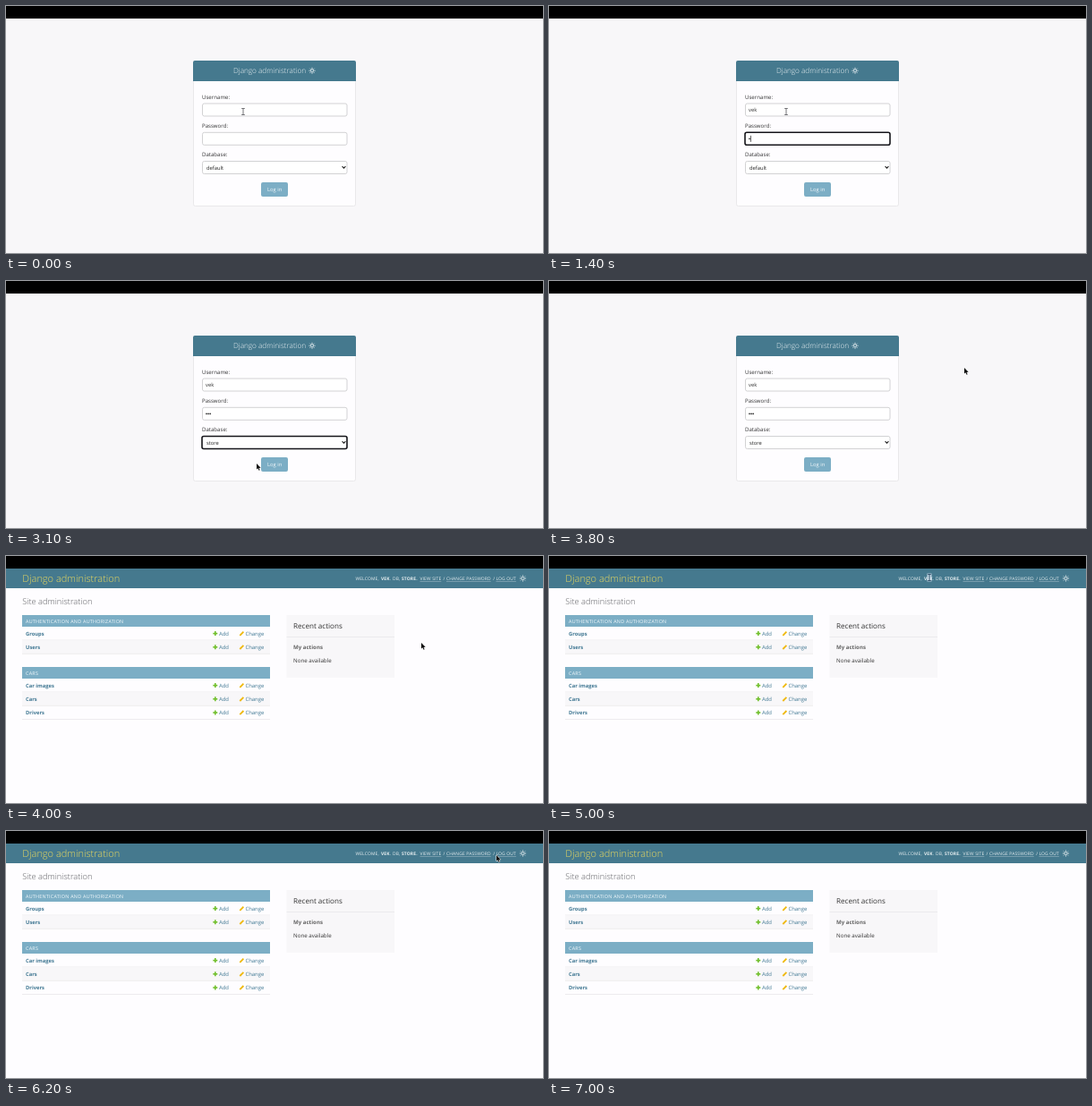
Recreate the animation shown at these times as an HTML page with a canvas. Size 600x276 px, loop 7200 ms.

```html
<!DOCTYPE html>
<html lang="en">
<head>
<meta charset="utf-8">
<title>Django administration</title>
<style>
  html, body { margin: 0; width: 600px; height: 276px; overflow: hidden; }
  canvas { display: block; }
</style>
</head>
<body>
<canvas id="stage" width="600" height="276"></canvas>
<script>
const ctx = document.getElementById('stage').getContext('2d');
const LOOP = 7200, STEP = 100;
const TEAL = '#45798e', BLUE = '#7caec5', LINK = '#417893', PALE = '#f8f7f9';
const USER = 'vek';

// Pointer path: time, x, y
const PATH = [
  [3000, 279, 198], [3100, 280, 204], [3300, 293, 207], [3500, 297, 208],
  [3600, 312, 204], [3700, 374, 180], [3800, 464, 97], [4100, 464, 97],
  [4200, 463, 88], [4400, 442, 40], [4600, 428, 24], [5000, 425, 24],
  [5300, 448, 24], [5500, 470, 24], [5900, 515, 24], [6100, 545, 25],
  [6200, 548, 27], [6300, 550, 28], [6400, 530, 45], [6500, 440, 108],
  [6600, 310, 185], [6700, 179, 249], [6800, 60, 300]
];

function rect(x, y, w, h, color) {
  ctx.fillStyle = color;
  ctx.fillRect(x, y, w, h);
}

function box(x, y, w, h, r, fill, stroke, width = 1) {
  ctx.beginPath();
  ctx.roundRect(x, y, w, h, r);
  if (fill) { ctx.fillStyle = fill; ctx.fill(); }
  if (stroke) { ctx.strokeStyle = stroke; ctx.lineWidth = width; ctx.stroke(); }
}

function line(points, color, width) {
  ctx.beginPath();
  points.forEach(([x, y]) => ctx.lineTo(x, y));
  ctx.strokeStyle = color;
  ctx.lineWidth = width;
  ctx.stroke();
}

function text(str, x, y, size, color, weight = 400, spacing = 0) {
  ctx.font = `${weight} ${size}px "Open Sans", "Noto Sans", sans-serif`;
  ctx.letterSpacing = spacing + 'px';
  ctx.fillStyle = color;
  ctx.fillText(str, x, y);
  return ctx.measureText(str).width;
}

function sun(x, y, color) {
  ctx.beginPath();
  ctx.arc(x, y, 1.6, 0, 7);
  ctx.strokeStyle = color;
  ctx.lineWidth = 0.9;
  ctx.stroke();
  for (let i = 0; i < 8; i++) {
    const c = Math.cos(i * Math.PI / 4), s = Math.sin(i * Math.PI / 4);
    line([[x + c * 2.3, y + s * 2.3], [x + c * 3.6, y + s * 3.6]], color, 0.8);
  }
}

function arrow(x, y) {
  const shape = [[0, 0], [0, 6.6], [1.5, 5.3], [2.6, 7.8], [3.7, 7.3], [2.6, 4.9], [4.7, 4.7]];
  ctx.beginPath();
  shape.forEach(([dx, dy]) => ctx.lineTo(x + dx, y + dy));
  ctx.closePath();
  ctx.strokeStyle = '#fff';
  ctx.lineWidth = 1;
  ctx.stroke();
  ctx.fillStyle = '#111';
  ctx.fill();
}

function beam(x, y, color) {
  line([[x, y - 3.5], [x, y + 3.5]], color, 0.9);
  for (const dy of [-3.5, 3.5]) line([[x - 1.8, y + dy], [x + 1.8, y + dy]], color, 0.9);
}

function pointer(t) {
  const i = PATH.findIndex(key => key[0] > t);
  if (i < 1) return;
  const [t0, x0, y0] = PATH[i - 1], [t1, x1, y1] = PATH[i];
  const k = (t - t0) / (t1 - t0);
  const x = x0 + (x1 - x0) * k, y = y0 + (y1 - y0) * k;
  if (t >= 4600 && t < 5500) {
    rect(x - 2.5, y - 4.5, 5, 9, 'rgba(225,238,250,0.75)');
    beam(x, y, '#2b4a66');
  } else arrow(x, y);
}

const typed = (t, times) => times.filter(at => t >= at).length;

function field(label, y, focused) {
  text(label, 219, y - 4.6, 6.1, '#333');
  if (focused) box(219, y + 0.5, 162, 14, 2, '#fff', '#15151a', 1.6);
  else box(219.5, y + 0.5, 161.5, 14, 2, '#fff', '#cdcdd0', 0.9);
}

const caret = (x, y) => rect(x, y - 3.5, 0.7, 7, '#222');

function loginPage(t) {
  rect(0, 14, 600, 262, PALE);
  box(209.5, 61.5, 181, 162, 2, '#fefdff', '#e9e8ea', 1);
  box(209, 61, 182, 23, [2, 2, 0, 0], TEAL);
  text('Django administration', 254, 75.4, 8.2, '#edf3f5', 300);
  sun(342, 72.3, '#edf3f5');

  const inName = t >= 300 && t < 1100;
  const inPass = t >= 1100 && t < 2200;
  const inSelect = t >= 2200 && t < 3700;

  field('Username:', 108.5, inName);
  const name = USER.slice(0, typed(t, [600, 700, 900]));
  const nameWidth = text(name, 223, 118, 5.8, '#333');
  if (inName) caret(223 + nameWidth, 116);

  field('Password:', 140.8, inPass);
  const dots = typed(t, [1400, 1600, 1800]);
  for (let i = 0; i < dots; i++) {
    ctx.beginPath();
    ctx.arc(224 + i * 2.1, 148.3, 0.9, 0, 7);
    ctx.fillStyle = '#333';
    ctx.fill();
  }
  if (inPass) caret(223.2 + dots * 2.1, 148.3);

  field('Database:', 173, inSelect);
  text(t < 2400 ? 'default' : 'store', 224, 182.5, 5.8, '#222');
  line([[375.6, 179.2], [377.5, 181.2], [379.4, 179.2]], '#222', 1.1);

  box(285, 197, 30, 16, 2, BLUE);
  text('Log in', 292, 207.3, 5.8, '#f4f9fb');

  if (t < 1700) beam(265, 118, '#66666a');
}

function moduleTable(title, y, rows) {
  rect(18, y, 277, 13, BLUE);
  text(title, 22, y + 8.6, 5.4, '#f5fafc', 400, 0.25);
  rows.forEach((name, i) => {
    const top = y + 13 + i * 15.2, mid = top + 8;
    if (i % 2) rect(18, top, 277, 15, PALE);
    rect(18, top + 14.6, 277, 0.8, '#e9e8ea');
    text(name, 22, mid + 2, 5.8, LINK, 700);
    line([[231.3, mid - 0.4], [236.3, mid - 0.4]], '#70bf2b', 1.6);
    line([[233.8, mid - 2.9], [233.8, mid + 2.1]], '#70bf2b', 1.6);
    text('Add', 238, mid + 2, 5.9, LINK);
    line([[261.3, mid + 1.8], [265.4, mid - 2.4]], '#efb80b', 1.8);
    text('Change', 267.5, mid + 2, 5.9, LINK);
  });
}

function userTools() {
  const put = (str, x, weight) => text(str, x, 26.6, 4.95, '#e9f0f2', weight, 0.15);
  put('WELCOME,', 390.5);
  put(USER.toUpperCase(), 419, 700);
  put('. DB,', 429);
  put('STORE.', 442, 700);
  put('/', 488.5);
  put('/', 544.2);
  for (const [str, x] of [['VIEW SITE', 462.5], ['CHANGE PASSWORD', 492], ['LOG OUT', 547.5]]) {
    rect(x, 28, put(str, x), 0.6, 'rgba(255,255,255,0.45)');
  }
  sun(577.5, 25, '#e9f0f2');
}

function adminPage() {
  rect(0, 14, 600, 262, '#fefdff');
  rect(0, 14, 600, 22, TEAL);
  text('Django administration', 18.3, 28.8, 11, '#ead95f', 300);
  userTools();
  text('Site administration', 18.3, 54.2, 9.3, '#5f5f63', 300);
  moduleTable('AUTHENTICATION AND AUTHORIZATION', 66, ['Groups', 'Users']);
  moduleTable('CARS', 124, ['Car images', 'Cars', 'Drivers']);

  rect(313.5, 66, 120.5, 70, PALE);
  rect(313.5, 90, 120.5, 0.8, '#e9e8ea');
  text('Recent actions', 321, 80.9, 8.1, '#333');
  text('My actions', 321, 104, 6.1, '#666', 700);
  text('None available', 321, 119.3, 6.2, '#333');
}

function draw(now) {
  const t = Math.floor(now % LOOP / STEP) * STEP;
  ctx.textRendering = 'geometricPrecision';
  rect(0, 0, 600, 276, '#000');
  if (t < 4000) loginPage(t);
  else adminPage();
  pointer(t);
  requestAnimationFrame(draw);
}

const start = performance.now();
requestAnimationFrame(now => draw(Math.max(0, now - start)));
</script>
</body>
</html>
```
